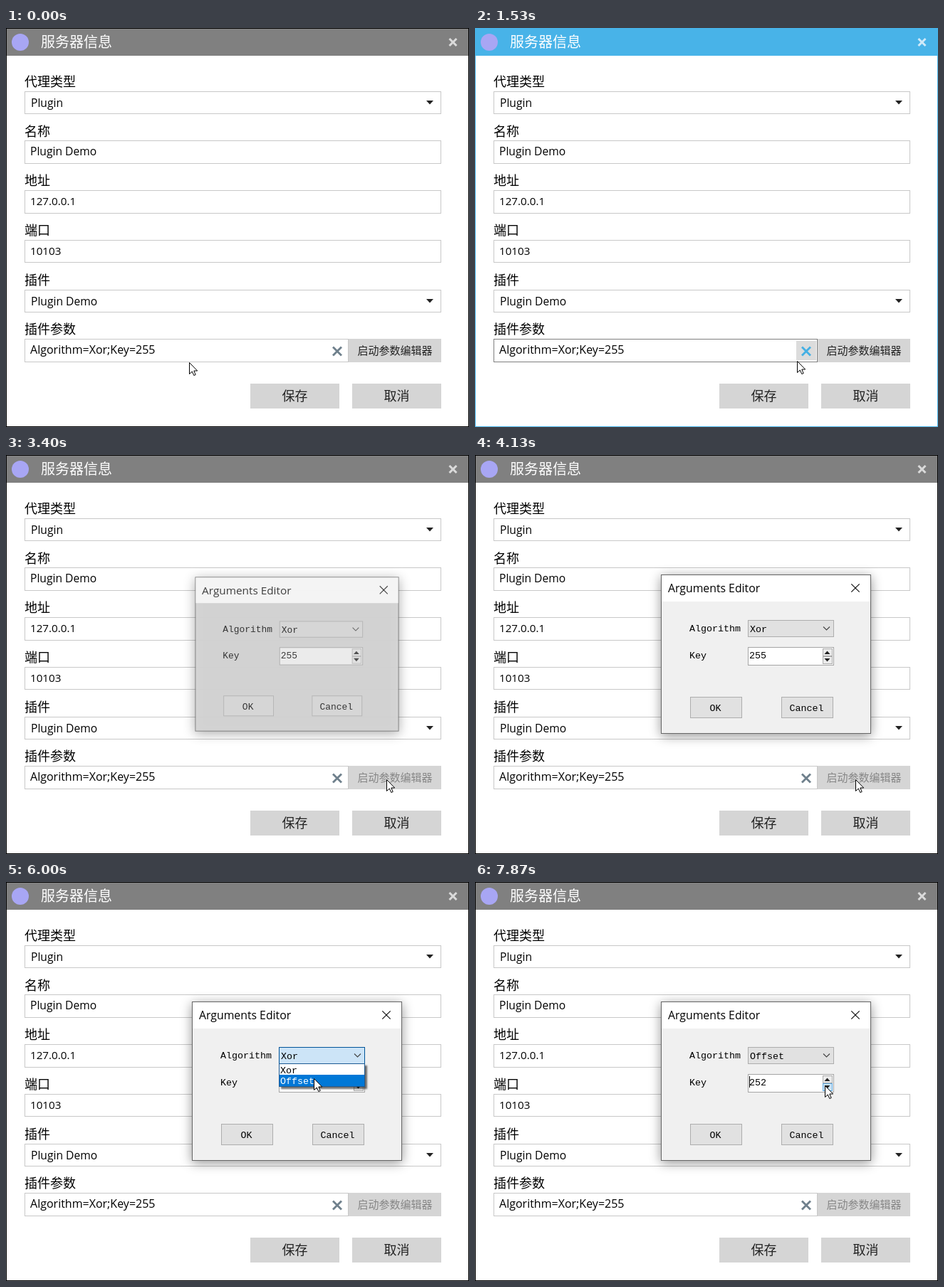
An HTML page with a canvas that plays this animation: 650 px wide and 561 px high, repeating every 8 s.

```html
<!DOCTYPE html>
<html lang="zh-CN">
<head>
<meta charset="utf-8">
<title>服务器信息</title>
<style>
  html, body { margin: 0; width: 100%; height: 100%; overflow: hidden; background: #fff; }
  canvas { display: block; }
</style>
</head>
<body>
<canvas id="stage" width="650" height="561"></canvas>
<script>
const ctx = document.getElementById('stage').getContext('2d');
const LOOP = 8000, TICKS_PER_SECOND = 15;
const CJK = '"Noto Sans CJK SC", "Noto Sans CJK", sans-serif';
const UI = '"Open Sans", "Noto Sans", sans-serif';
const MONO = '13.33px "Liberation Mono", monospace';
const BLUE = '#48b3e8', GRAY = '#808080', BUTTON = '#d5d5d5', INK = '#222';

// Moments of the interaction, in ticks
const ACTIVATE = 6, PRESS = 43, RELEASE = 46, DIALOG = 49, COMBO_HOVER = 75,
      LIST_OPEN = 79, NEXT_ITEM = 89, LIST_CLOSE = 95, SPIN_HOVER = 105,
      SPIN_STEPS = [112, 115, 118];

// Pointer path: tick, x, y
const PATH = [
  [0, 257, 470], [3, 247, 491], [12, 247, 491], [16, 310, 495], [20, 416, 480],
  [23, 470, 462], [25, 506, 461], [31, 534, 456], [61, 534, 456], [62, 525, 456],
  [66, 468, 385], [70, 430, 300], [74, 456, 250], [77, 456, 250], [80, 449, 246],
  [81, 449, 246], [86, 436, 266], [88, 436, 266], [90, 432, 276], [94, 432, 276],
  [105, 499, 282], [107, 499, 282], [109, 491, 286], [120, 491, 286]
];

const clamp = v => Math.max(0, Math.min(1, v));

function pointerAt(tick) {
  const i = Math.max(1, PATH.findIndex(p => p[0] >= tick));
  const [t0, x0, y0] = PATH[i - 1], [t1, x1, y1] = PATH[i];
  const k = (tick - t0) / (t1 - t0);
  return [Math.round(x0 + (x1 - x0) * k), Math.round(y0 + (y1 - y0) * k)];
}

function box(x, y, w, h, fill, border) {
  ctx.fillStyle = border || fill;
  ctx.fillRect(x, y, w, h);
  if (border) {
    ctx.fillStyle = fill;
    ctx.fillRect(x + 1, y + 1, w - 2, h - 2);
  }
}

function text(str, x, y, font, color = '#000', align = 'left') {
  ctx.font = font;
  ctx.fillStyle = color;
  ctx.textAlign = align;
  ctx.fillText(str, x, y);
}

function line(points, color, width) {
  ctx.beginPath();
  points.forEach(([x, y]) => ctx.lineTo(x, y));
  ctx.strokeStyle = color;
  ctx.lineWidth = width;
  ctx.stroke();
}

function cross(x, y, r, color, width) {
  line([[x - r, y - r], [x + r, y + r]], color, width);
  line([[x - r, y + r], [x + r, y - r]], color, width);
}

// Negative h points the triangle upwards
function triangle(x, y, halfWidth, h) {
  ctx.fillStyle = '#222';
  ctx.beginPath();
  ctx.moveTo(x - halfWidth, y);
  ctx.lineTo(x + halfWidth, y);
  ctx.lineTo(x, y + h);
  ctx.fill();
}

function field(label, labelY, y, h, value, baseline, size, isCombo) {
  text(label, 26, labelY, '18px ' + CJK);
  box(26, y, 585, h, '#fff', '#c8c8c8');
  text(value, isCombo ? 35 : 34, baseline, size + 'px ' + UI);
  if (isCombo) triangle(595, y + 13, 5, 5.5);
}

function drawParameters(tick, x, y) {
  const disabled = tick >= DIALOG;
  const inRow = !disabled && y >= 437 && y < 470;
  const overField = inRow && x < 481, overClear = overField && x >= 451;
  const overButton = inRow && x >= 481;
  const pressed = tick >= PRESS && tick < RELEASE;

  text('插件参数', 26, 430, '18px ' + CJK);
  box(26, 437, 455, 33, '#fff', overField ? '#7f7f7f' : '#c8c8c8');
  text('Algorithm=Xor;Key=255', 34, 458, '16px ' + UI);
  if (overClear) box(451, 440, 28, 27, '#dcdcdc');
  cross(465, 454.5, 6, overClear ? '#45b0e4' : '#6f808c', 2.8);

  box(481, 437, 130, 33, pressed ? INK : overButton ? '#a9a9a9' : BUTTON);
  text('启动参数编辑器', 546, 459, '15px ' + CJK,
       pressed ? '#fff' : disabled ? '#868686' : INK, 'center');
}

function drawWindow(tick, x, y) {
  const active = tick >= ACTIVATE && tick < DIALOG;
  box(0, 0, 650, 561, '#fff', active ? BLUE : '#000');
  box(1, 1, 648, 38, active ? BLUE : GRAY);
  ctx.fillStyle = '#a8a6f4';
  ctx.beginPath();
  ctx.arc(20, 20, 12, 0, Math.PI * 2);
  ctx.fill();
  text('服务器信息', 49, 27, '20px ' + CJK, '#fff');
  cross(627.5, 20, 5, active ? '#cfeaf9' : '#dadada', 3);

  field('代理类型', 82, 89, 32, 'Plugin', 111, 15.6, true);
  field('名称', 152, 158, 33, 'Plugin Demo', 179, 15.6);
  field('地址', 221, 228, 33, '127.0.0.1', 249, 15.2);
  field('端口', 291, 298, 32, '10103', 319, 15.2);
  field('插件', 361, 368, 32, 'Plugin Demo', 390, 15.6, true);
  drawParameters(tick, x, y);

  [['保存', 343], ['取消', 486]].forEach(([label, left]) => {
    box(left, 500, 125, 35, BUTTON);
    text(label, left + 62.5, 524, '18px ' + CJK, INK, 'center');
  });
}

function drawCombo(tick) {
  const open = tick >= LIST_OPEN && tick < LIST_CLOSE;
  const glow = tick < LIST_CLOSE ? clamp((tick - COMBO_HOVER + 1) / 4)
                                 : clamp((LIST_CLOSE + 3 - tick) / 4);
  box(383, 232, 121, 24, '#e1e1e1', '#adadad');
  ctx.save();
  ctx.globalAlpha *= glow;
  box(383, 232, 121, 24, open ? '#cce4f7' : '#e5f1fb', open ? '#005499' : '#0078d7');
  ctx.restore();
  text(tick >= LIST_CLOSE ? 'Offset' : 'Xor', 386, 249, MONO);
  line([[489, 241.5], [493.5, 246], [498, 241.5]], '#444', 1.1);
}

function drawSpinner(tick) {
  const steps = SPIN_STEPS.filter(t => tick >= t).length;
  box(383, 270, 121, 26, '#fff', '#a5a5a5');
  text(255 - steps, 385, 286, MONO);
  if (steps) box(385, 273, 1, 16, '#000');
  box(488, 272, 14, 11, '#ececec', '#acacac');
  if (tick >= SPIN_HOVER) box(488, 283, 14, 11, steps ? '#cce4f7' : '#e5f1fb', '#5fa9e0');
  else box(488, 283, 14, 11, '#ececec', '#acacac');
  triangle(494.5, 280, 4, -4.5);
  triangle(494.5, 286, 4, 4.5);
}

function drawList(tick) {
  const rows = ['Xor', 'Offset'], selected = tick >= NEXT_ITEM ? 1 : 0;
  ctx.save();
  ctx.shadowColor = 'rgba(0,0,0,.55)';
  ctx.shadowBlur = 2;
  ctx.shadowOffsetX = ctx.shadowOffsetY = 2.5;
  box(383, 255, 121, 33, '#1c5a94');
  ctx.restore();
  box(384, 256, 119, 31, '#fff');
  rows.forEach((label, i) => {
    if (i === selected) box(384, 256 + i * 15, 119, 16, '#0078d7');
    text(label, 385, 269 + i * 15, MONO, i === selected ? '#fff' : '#000');
  });
}

function drawDialog(tick) {
  const k = clamp((tick - DIALOG + 1) / 6), ease = 1 - (1 - k) ** 2;
  const scale = 0.88 + 0.12 * ease;
  ctx.save();
  ctx.globalAlpha = ease;
  ctx.translate(408.5, 280);
  ctx.scale(scale, scale);
  ctx.translate(-408.5, -280);

  ctx.save();
  ctx.shadowColor = 'rgba(0,0,0,.42)';
  ctx.shadowBlur = 15;
  ctx.shadowOffsetY = 3;
  box(261, 168, 295, 224, '#666');
  ctx.restore();
  box(262, 169, 293, 222, '#f0f0f0');
  box(262, 169, 293, 37, '#fff');
  text('Arguments Editor', 271, 193, '15.8px ' + UI);
  cross(534, 187, 5.7, '#111', 1.2);

  text('Algorithm', 301, 248, MONO);
  text('Key', 301, 286, MONO);
  drawCombo(tick);
  drawSpinner(tick);
  [['OK', 302], ['Cancel', 430]].forEach(([label, left]) => {
    box(left, 340, 73, 30, '#e1e1e1', '#adadad');
    text(label, left + 35.5, 360, MONO, '#000', 'center');
  });
  if (tick >= LIST_OPEN && tick < LIST_CLOSE) drawList(tick);
  ctx.restore();
}

const arrow = new Path2D('M.5 .5V16.5L4.3 13L6.8 18.5L9.2 17.5L6.8 12H11.7Z');

function drawPointer(x, y) {
  ctx.save();
  ctx.translate(x, y);
  ctx.fillStyle = '#fff';
  ctx.fill(arrow);
  ctx.strokeStyle = '#000';
  ctx.lineWidth = 1;
  ctx.stroke(arrow);
  ctx.restore();
}

function frame() {
  const seconds = (performance.now() % LOOP) / 1000;
  const tick = Math.floor(seconds * TICKS_PER_SECOND + 0.01);
  const [x, y] = pointerAt(tick);
  drawWindow(tick, x, y);
  if (tick >= DIALOG) drawDialog(tick);
  drawPointer(x, y);
  requestAnimationFrame(frame);
}
frame();
</script>
</body>
</html>
```
